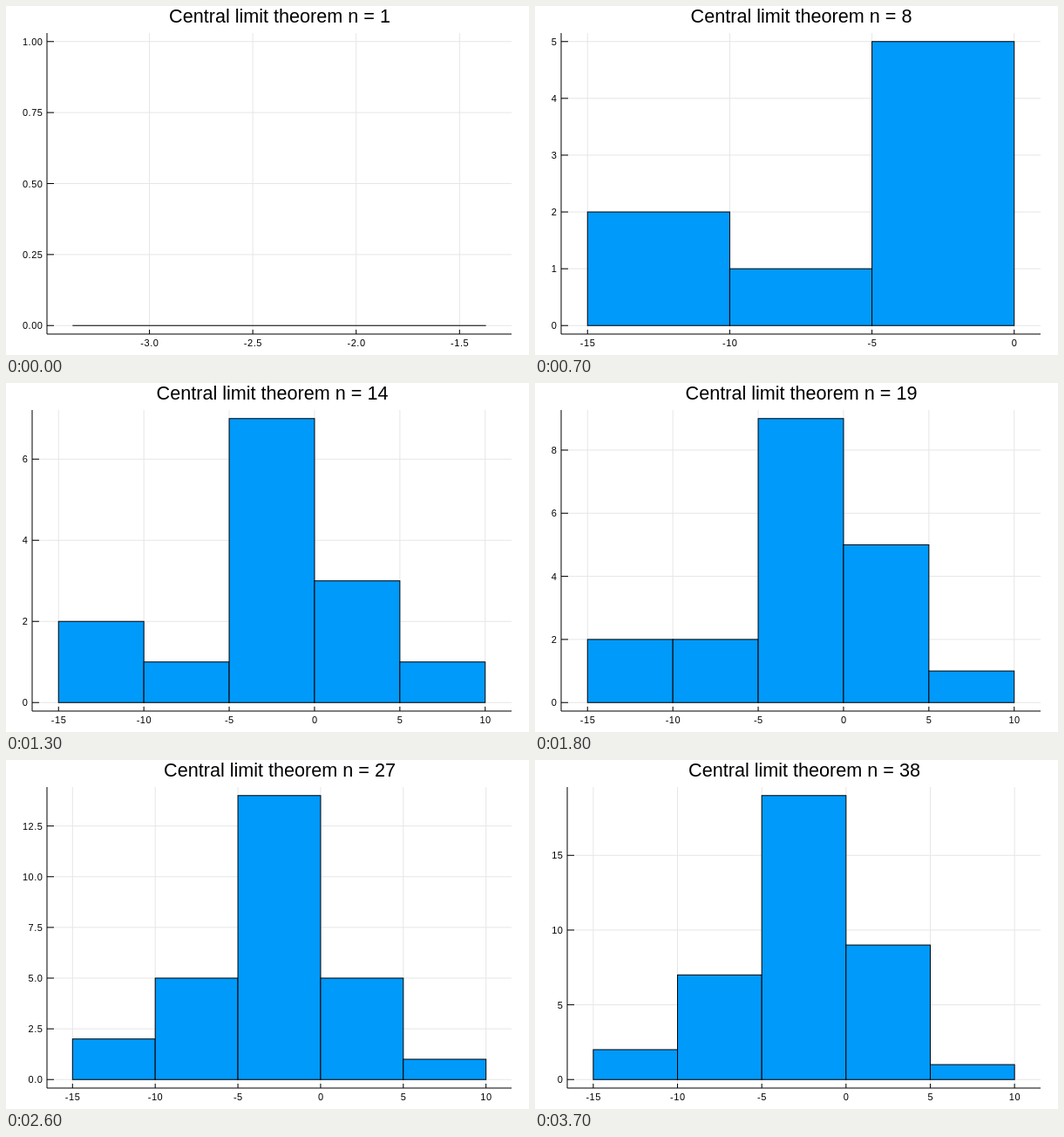
These frames come from a looping animation (600x400 px, 3.8 s). An HTML page:

```html
<!DOCTYPE html>
<html lang="en">
<head>
<meta charset="utf-8">
<title>Central limit theorem</title>
<style>
html, body { margin: 0; width: 100%; height: 100%; overflow: hidden; background: #fff; }
svg { display: block; font: 11px "Liberation Sans", Arial, sans-serif; letter-spacing: .55px; text-anchor: middle; }
path, rect { stroke: #000; fill: none; }
.grid { stroke: #e6e6e6; }
rect { fill: #009afa; }
.title { font-size: 21.6px; letter-spacing: 0; }
.y { text-anchor: end; }
</style>
</head>
<body>
<svg id="plot" width="600" height="400" viewBox="0 0 600 400"></svg>
<script>
const plot = document.getElementById("plot");
const RIGHT = 580, TOP = 31, BOTTOM = 376, PAD_Y = (BOTTOM - TOP) * 0.03 / 1.06;
const ZERO = BOTTOM - PAD_Y, HEIGHT = BOTTOM - TOP - 2 * PAD_Y;

// Bin of each successive sample: five bins of width 5 from -15 to 10
const samples = [..."20221202323234231232122121223212321233"].map(Number);

function histogram(n) {
  if (n === 1) return { lo: -3.372, width: 2, counts: [0], xStep: 0.5 };
  const bins = samples.slice(0, n);
  if (n < 6) {
    const low = bins.filter(b => b === 0).length;
    return { lo: -20, width: 10, counts: [low, n - low], xStep: 5 };
  }
  const counts = Array(Math.max(...bins) + 1).fill(0);
  bins.forEach(b => counts[b]++);
  return { lo: -15, width: 5, counts, xStep: 5 };
}

function yTickStep(max) {
  if (max < 3) return max / 4;
  return max < 6 ? 1 : max < 10 ? 2 : max < 15 ? 2.5 : 5;
}

function ticks(lo, hi, step) {
  const list = [];
  for (let v = Math.ceil(lo / step) * step; v <= hi; v += step) list.push(v);
  const digits = step % 1 === 0 ? 0 : step === 0.25 ? 2 : 1;
  return list.map(v => ({ v, label: v.toFixed(digits).replace(/^-0$/, "0") }));
}

const line = (d, cls = "") => `<path class="${cls}" d="${d}"/>`;
const text = (x, y, s, cls = "") => `<text class="${cls}" x="${x}" y="${y}">${s}</text>`;
const textWidth = s => [...s].reduce((w, c) => w + (c === "." ? 3.33 : 6.67), 0);

function draw(n) {
  const { lo, width, counts, xStep } = histogram(n);
  const hi = lo + width * counts.length;
  const max = Math.max(1, ...counts);
  const yTicks = ticks(0, max, yTickStep(max));
  const left = Math.floor(24 + Math.max(...yTicks.map(t => textWidth(t.label))));
  const pad = (RIGHT - left) * 0.055;
  const X = v => left + pad + (v - lo) / (hi - lo) * (RIGHT - left - 2 * pad);
  const Y = v => ZERO - v / max * HEIGHT;

  let grid = "", marks = "", bars = "";
  for (const { v, label } of ticks(lo, hi, xStep)) {
    grid += line(`M${X(v)} ${TOP}V${BOTTOM}`, "grid");
    marks += line(`M${X(v)} ${BOTTOM}v-5`) + text(X(v) + 0.3, 390, label);
  }
  for (const { v, label } of yTicks) {
    grid += line(`M${left} ${Y(v)}H${RIGHT}`, "grid");
    marks += line(`M${left} ${Y(v)}h8`) + text(left - 4.5, Y(v) + 4, label, "y");
  }
  counts.forEach((c, i) => {
    const x = X(lo + i * width), w = X(lo + (i + 1) * width) - x;
    bars += c ? `<rect x="${x}" y="${Y(c)}" width="${w}" height="${ZERO - Y(c)}"/>`
              : line(`M${x} ${ZERO}h${w}`);
  });
  plot.innerHTML = grid + line(`M${left} ${TOP}V${BOTTOM}H${RIGHT}`) + marks + bars +
    text((left + RIGHT) / 2 + 0.5, 19, `Central limit theorem n = ${n}`, "title");
}

let shown = 0;
function tick() {
  const n = Math.floor(performance.now() / 100) % samples.length + 1;
  if (n !== shown) draw(shown = n);
  requestAnimationFrame(tick);
}
tick();
</script>
</body>
</html>
```
